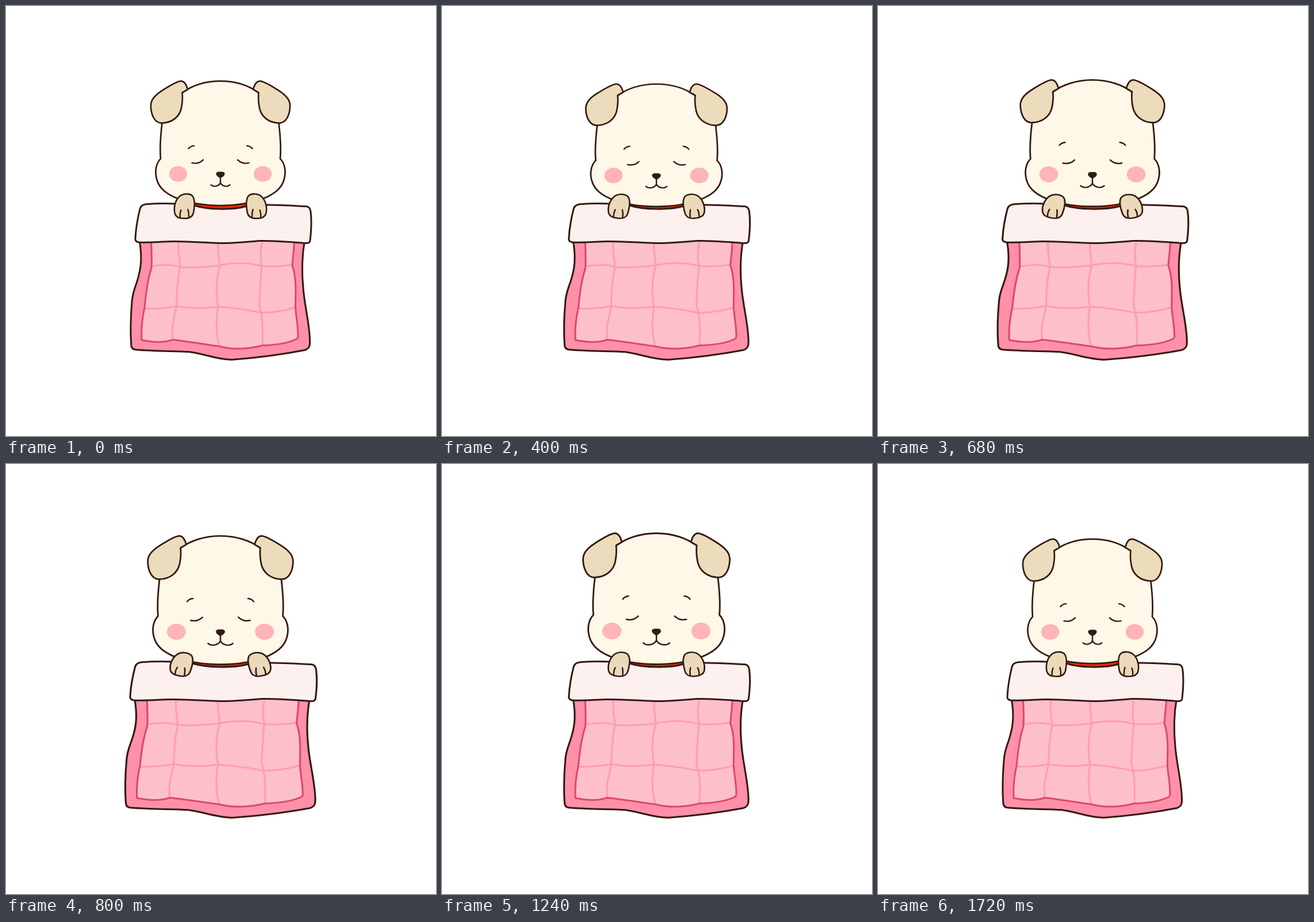
These frames come from a looping animation (748 px wide and 748 px high, 1.84 s). An HTML page with a canvas:

```html
<!DOCTYPE html>
<html lang="en">
<head>
<meta charset="utf-8">
<title>Sleepy puppy</title>
<style>
html, body { margin: 0; width: 100%; height: 100%; overflow: hidden; background: #fff; }
canvas { display: block; width: 100%; height: 100%; }
</style>
</head>
<body>
<canvas id="stage" width="748" height="748"></canvas>
<script>
const ctx = document.getElementById('stage').getContext('2d');
const LOOP = 1840, STEP = 40, LAST = 1720;
const MID = 373, CROWN = 131;
const INK = '#351a12';

const path = d => new Path2D(d);

const quilt = path(`M232 408 C236 430 236.5 448 231 468 C227 486 220 496 219 515
  C216.5 545 216.5 572 217.8 590 Q218.5 597 225 597.8 C262 601 292 600 320 601.8
  C345 605 366 615 393 615.3 C435 612 482 606 520 598.5 Q528 596 528.5 588
  C530 562 520 525 517.3 494 C514 462 514.5 436 519.5 408 Z`);

const panel = path(`M252.5 408 C253 425 254 440 253 456 C246 478 243.5 500 241 525
  C236.5 545 235 562 236 581 C254 585 275 586 290 580.5 C312 583 343 588 371 592
  C396 599 425 596 446 590.5 C468 590 490 587 506 579 Q508.5 577 508 572
  C508 555 504 538 503.5 523 C503.5 500 506 475 498 451 C499 437 501 425 501.5 408 Z`);

const seams = path(`M300 412 C299 428 302 440 303 454 C298 478 297 500 296.5 523
  C292 545 287 560 290 580
  M369 412 C368 428 371 440 372 452 C365 475 365 500 369 523 C365 545 365 568 371 592
  M445 412 C442 428 442 440 445 452 C442 478 442 500 440.5 518 C441 524 443 530 444 534
  C447 552 447 570 446 590
  M253 453 C270 450 288 449 303 454 C326 456 350 454 372 451 C396 446 420 446 444 452
  C462 454 480 453 498 450
  M240 526 C260 528 280 525 297 522 C320 527 346 526 369 523 C394 525 420 528 444 534
  C466 533 486 530 505 524`);

const fold = path(`M244 344.8 C272 342.5 300 343.5 328 347 C352 355 396 355 419 348
  C450 344 488 347 522 348.5 Q529 349 530 358 C532 375 531 392 529 408
  Q528 413 522 412.5 C500 411 470 408 442 408.5 C418 410 396 413 372 412.5
  C345 412 320 409 290 409.5 C270 410 250 412 231 411 Q224 410 225 404
  C226 386 229 369 233 353 Q235 345.5 244 344.8 Z`);

const collar = path('M322 338 H425 V357 H322 Z');

const head = path(`M373 131 C345 131 322 140 307 151 C285 165 274 185 271.5 204
  C269 225 267 245 269 266 C260 275 259 290 262 301 C266 318 280 328 300 336
  C325 345 350 347.5 373 347.5 C396 347.5 421 345 446 336 C466 328 480 318 484 301
  C487 290 486 275 477 266 C479 245 477 225 474.5 204 C472 185 461 165 439 151
  C424 140 401 131 373 131 Z`);

const ear = path(`M316 145.5 C314 138 311 131.5 305 131 C298 130.5 283 140 270 148.5
  C256 158 251 166 252 177 C253 191 259 203.5 270 204 C290 204 302 192 305 178
  C307 168 307.5 160 306.5 151 Z`);

const brow = path('M317.5 248.5 Q321 244 327 243.5');
const eye = path('M323.5 273.3 Q335 276 343 268');
const nose = path(`M373 288.8 C378 288 381 290 380.5 293 C380 296 375 299.5 373 299.5
  C371 299.5 366 296 365.5 293 C365 290 368 288 373 288.8 Z`);
const stem = path('M373 298 V308.5');
const lip = path('M0 0 C-3.5 6 -12 7.5 -16.5 3.3');

const paw = path(`M294 362 C291 352 294 340 300 333 C306 326 318 325 324 330
  C329 336 328 350 326 360 C324 368 318 370 309 369.5 C301 369.5 296 367 294 362 Z`);
const claws = path('M304.5 355 Q302 361 303 368 M316.5 354 Q318.5 360 318 368');

function shape(p, fill, line, width) {
  if (fill) { ctx.fillStyle = fill; ctx.fill(p); }
  if (line) { ctx.strokeStyle = line; ctx.lineWidth = width; ctx.stroke(p); }
}

function scoped(draw) {
  ctx.save();
  draw();
  ctx.restore();
}

// Draws a part and its mirror image about the vertical line at x.
function both(draw, x = MID) {
  scoped(draw);
  scoped(() => {
    ctx.translate(2 * x, 0);
    ctx.scale(-1, 1);
    draw();
  });
}

function stretchX(s) {
  ctx.translate(MID, 0);
  ctx.scale(s, 1);
  ctx.translate(-MID, 0);
}

// Value at time t along [time, value] keys, with a sine ease between them.
function track(t, keys) {
  for (let i = 1; i < keys.length; i++) {
    const [t0, v0] = keys[i - 1], [t1, v1] = keys[i];
    if (t <= t1) return v0 + (v1 - v0) * (1 - Math.cos(Math.PI * (t - t0) / (t1 - t0))) / 2;
  }
  return keys[keys.length - 1][1];
}

function drawHead(t) {
  const swell = track(t, [[0, 0], [1170, 1], [LAST, 0]]);
  const top = track(t, [[0, 130.6], [260, 136.8], [1120, 120], [1160, 120], [LAST, 130.6]]);
  const tall = track(t, [[0, 1], [260, 0.98], [1120, 1.055], [1160, 1.055], [LAST, 1]]);

  ctx.translate(MID, top);
  ctx.scale(1 + 0.056 * swell, tall);
  ctx.translate(-MID, -CROWN);

  shape(head, '#fff8e8', INK, 2.7);
  both(() => {
    shape(ear, '#eddcbc', INK, 2.7);
    ctx.fillStyle = '#ffb4b8';
    ctx.beginPath();
    ctx.ellipse(299.5, 292.5, 15.7, 13.7, 0, 0, 7);
    ctx.fill();
    shape(eye, null, INK, 2.4);
    ctx.translate(0, -9 * swell);
    shape(brow, null, INK, 2.4);
  });
  shape(nose, INK);
  shape(stem, null, INK, 2.4);
  ctx.translate(MID, 308.3);
  ctx.scale(1 + 0.33 * swell, 1 + 0.25 * swell);
  both(() => shape(lip, null, INK, 2.4 / (1 + 0.29 * swell)), 0);
}

function drawPaw(breath) {
  ctx.translate(310.5 - 5 * breath, 348);
  ctx.rotate(0.17 * breath);
  ctx.scale(1 + 0.07 * breath, 1 - 0.03 * breath);
  ctx.translate(-310.5, -348);
  shape(paw, '#ebdab9', INK, 2.6);
  shape(claws, null, INK, 2.4);
}

function render(t) {
  const breath = track(t, [[0, 0], [820, 1], [1640, 0]]);
  const wide = 1 + 0.0605 * breath;

  ctx.fillStyle = '#fff';
  ctx.fillRect(0, 0, 748, 748);
  ctx.lineCap = ctx.lineJoin = 'round';

  scoped(() => {
    stretchX(wide);
    shape(quilt, '#ff90a9', INK, 3);
    shape(panel, '#fdbfc9');
    shape(seams, null, '#ff9db2', 3);
    shape(panel, null, '#dc4870', 3);
    shape(collar, '#f02800');
  });
  scoped(() => drawHead(t));
  scoped(() => {
    stretchX(wide);
    shape(fold, '#fdf1f0', INK, 3);
  });
  both(() => drawPaw(breath));
}

const start = performance.now();
function tick() {
  const t = (performance.now() - start) % LOOP;
  render(Math.min(Math.floor(t / STEP) * STEP, LAST));
  requestAnimationFrame(tick);
}
tick();
</script>
</body>
</html>
```
